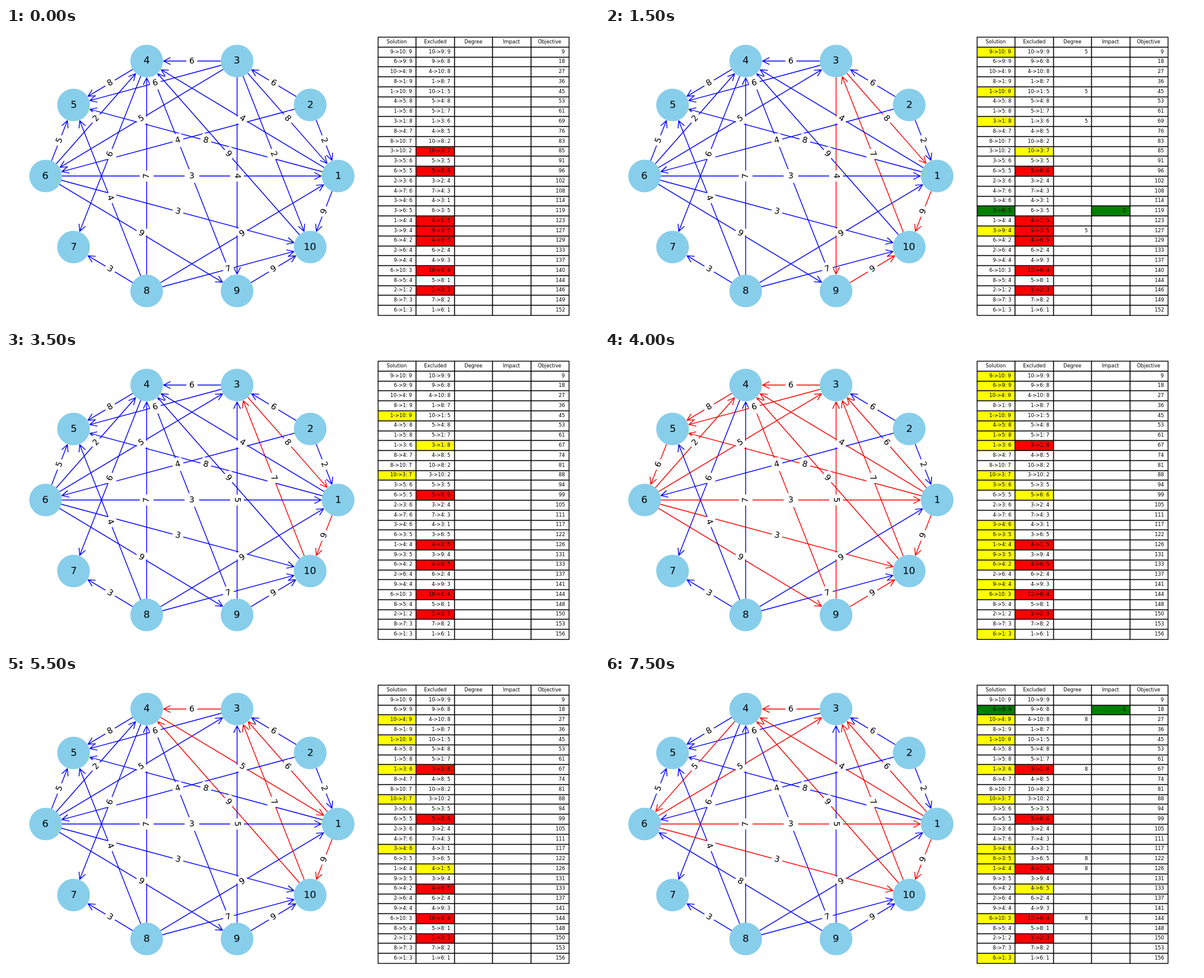
An HTML page with a canvas that plays this animation: 1000x500 px, repeating every 8000 ms.

```html
<!DOCTYPE html>
<html lang="en">
<head>
<meta charset="utf-8">
<title>Linear ordering search</title>
<style>
  html, body { margin: 0; width: 100%; height: 100%; overflow: hidden; background: #fff; }
  canvas { display: block; width: 100%; height: 100%; }
</style>
</head>
<body>
<canvas id="stage" width="1000" height="500"></canvas>
<script>
const ctx = document.getElementById('stage').getContext('2d');
const FONT = '"DejaVu Sans", sans-serif';
const PT = 100 / 72;
const STEP_MS = 500;

// from-to:weight/weight of the reversed arc
const START = `9-10:9/9 6-9:9/8 10-4:9/8 8-1:9/7 1-10:9/5 4-5:8/8 1-5:8/7 3-1:8/6 8-4:7/5
  8-10:7/2 3-10:2/7 3-5:6/5 6-5:5/6 2-3:6/4 4-7:6/3 3-4:6/1 3-6:5/5 1-4:4/5 3-9:4/5 6-4:2/5
  2-6:4/4 9-4:4/3 6-10:3/4 8-5:4/1 2-1:2/3 8-7:3/2 6-1:3/1`
  .split(/\s+/).map(s => {
    const [u, v, w, back] = s.split(/[-:/]/).map(Number);
    return { u, v, w, back };
  });

const reverse = e => ({ u: e.v, v: e.u, w: e.back, back: e.w });
const reverseRows = (rows, ids) => rows.map((e, i) => ids.includes(i) ? reverse(e) : e);
const IMPROVED = reverseRows(START, [10, 16, 18, 7]);

// trial: row forced in; flips: rows reversed to break cycles
const step = (rows, trial = -1, flips = [], degrees = flips.length > 0) =>
  ({ rows, trial, flips, degrees });
const STEPS = [
  step(START),
  step(START, 10),
  step(START, 10, [], true),
  step(START, 10, [16]),
  step(START, 10, [16, 18]),
  step(START, 10, [16, 18, 7]),
  step(IMPROVED),
  step(IMPROVED, 7),
  step(IMPROVED, 12),
  step(IMPROVED, 12, [], true),
  step(IMPROVED, 12, [5]),
  step(IMPROVED, 17),
  step(IMPROVED, 17, [], true),
  step(IMPROVED, 19),
  step(IMPROVED, 19, [], true),
  step(IMPROVED, 19, [1])
];

function reaches(arcs, from, to) {
  const seen = new Set([from]);
  for (const n of seen) arcs.forEach(e => { if (e.u === n) seen.add(e.v); });
  return seen.has(to);
}

function analyse({ rows, trial, flips, degrees }) {
  const arcs = reverseRows(rows, [trial, ...flips]);
  const cyclic = arcs.map(e => reaches(arcs, e.v, e.u));
  const impact = rows.map(e => e.back - e.w);
  const gain = [trial, ...flips].reduce((sum, i) => sum + (impact[i] || 0), 0);
  const nodeDegree = n => arcs.filter((e, i) => cyclic[i] && (e.u === n || e.v === n)).length;
  const degree = arcs.map((e, i) => {
    const usable = degrees && cyclic[i] && i !== trial && gain + impact[i] > 0;
    return usable ? nodeDegree(e.u) + nodeDegree(e.v) : '';
  });
  return { arcs, cyclic, impact, degree };
}

// ---- graph ----
const NODE_R = Math.sqrt(1500) / 2 * PT;
const NODES = Array.from({ length: 10 }, (_, i) => {
  const a = i * Math.PI / 5;
  // a hair of tilt decides which way vertical labels read
  const tilt = i === 8 ? 1e-6 : i === 7 ? -1e-6 : 0;
  return { x: 313.44 + 246.65 * Math.cos(a) + tilt, y: 250 - 204.2 * Math.sin(a) };
});

function setFont(size) {
  ctx.font = `${size}px ${FONT}`;
  ctx.fillStyle = '#000';
}

// align: 0 left, 0.5 centre, 1 right
function put(text, x, y, align) {
  ctx.fillText(text, Math.round(x - align * ctx.measureText(text).width), Math.round(y));
}

function drawArc(e, color) {
  const a = NODES[e.u - 1], b = NODES[e.v - 1];
  const len = Math.hypot(b.x - a.x, b.y - a.y);
  const tip = len - NODE_R - 1.55;
  const back = 8 * PT, half = 4 * PT;
  ctx.save();
  ctx.translate(a.x, a.y);
  ctx.rotate(Math.atan2(b.y - a.y, b.x - a.x));
  ctx.strokeStyle = color;
  ctx.lineWidth = PT;
  ctx.lineCap = ctx.lineJoin = 'round';
  ctx.beginPath();
  ctx.moveTo(NODE_R, 0);
  ctx.lineTo(tip, 0);
  ctx.moveTo(tip - back, -half);
  ctx.lineTo(tip, 0);
  ctx.lineTo(tip - back, half);
  ctx.stroke();
  ctx.restore();
}

function drawWeight(e) {
  const a = NODES[e.u - 1], b = NODES[e.v - 1];
  const size = 10 * PT, pad = 0.3 * size;
  ctx.save();
  ctx.translate((a.x + b.x) / 2, (a.y + b.y) / 2);
  ctx.rotate(Math.atan((b.y - a.y) / (b.x - a.x)));
  setFont(size);
  const w = ctx.measureText(e.w).width + 2 * pad, h = 0.968 * size + 2 * pad;
  ctx.fillStyle = ctx.strokeStyle = '#fff';
  ctx.lineWidth = PT;
  ctx.beginPath();
  ctx.roundRect(-w / 2, -h / 2, w, h, pad);
  ctx.fill();
  ctx.stroke();
  ctx.fillStyle = '#000';
  ctx.fillText(e.w, pad - w / 2, 0.276 * size);
  ctx.restore();
}

function drawNode({ x, y }, i) {
  const size = 12 * PT;
  ctx.fillStyle = '#87ceeb';
  ctx.beginPath();
  ctx.arc(x, y, NODE_R + PT / 2, 0, 2 * Math.PI);
  ctx.fill();
  setFont(size);
  put(i + 1, x, y + 0.276 * size, 0.5);
}

// ---- table ----
const HEADS = ['Solution', 'Excluded', 'Degree', 'Impact', 'Objective'];
const COL_W = 64.46, ROW_H = 470 / 28;
const colX = c => 626.9 + c * COL_W;
const rowY = r => 15 + r * ROW_H;
const snap = v => Math.round(v) + 0.5;

function drawCell(r, c, text, fill) {
  const x = snap(colX(c)), y = snap(rowY(r));
  const w = snap(colX(c + 1)) - x, h = snap(rowY(r + 1)) - y;
  ctx.fillStyle = fill || '#fff';
  ctx.fillRect(x, y, w, h);
  ctx.strokeStyle = '#000';
  ctx.lineWidth = PT;
  ctx.strokeRect(x, y, w, h);
  ctx.fillStyle = '#000';
  const base = rowY(r + 0.5) + 2.35;
  if (r === 0) put(text, colX(c + 0.5), base, 0.5);
  else put(text, colX(c + 0.9), base, 1);
}

function drawTable({ rows, trial, flips }, { cyclic, impact, degree }) {
  const name = e => `${e.u}->${e.v}: ${e.w}`;
  let total = 0;
  setFont(6 * PT);
  HEADS.forEach((text, c) => drawCell(0, c, text));
  rows.forEach((e, i) => {
    const flipped = flips.includes(i), tried = i === trial;
    const green = flipped && '#008000';
    const yellow = cyclic[i] && !tried && '#ff0';
    const excluded = tried ? '#ff0' : !flipped && impact[i] > 0 && '#f00';
    total += e.w;
    drawCell(i + 1, 0, name(e), green || yellow);
    drawCell(i + 1, 1, name(reverse(e)), excluded);
    drawCell(i + 1, 2, degree[i]);
    drawCell(i + 1, 3, flipped ? impact[i] : '', green);
    drawCell(i + 1, 4, total);
  });
}

function draw(state) {
  const info = analyse(state);
  ctx.fillStyle = '#fff';
  ctx.fillRect(0, 0, 1000, 500);
  info.arcs.forEach((e, i) => drawArc(e, info.cyclic[i] ? '#f00' : '#00f'));
  info.arcs.forEach(drawWeight);
  NODES.forEach(drawNode);
  drawTable(state, info);
}

let shown = -1;
function tick() {
  const now = Math.floor(performance.now() / STEP_MS) % STEPS.length;
  if (now !== shown) draw(STEPS[shown = now]);
  requestAnimationFrame(tick);
}
tick();
</script>
</body>
</html>
```
